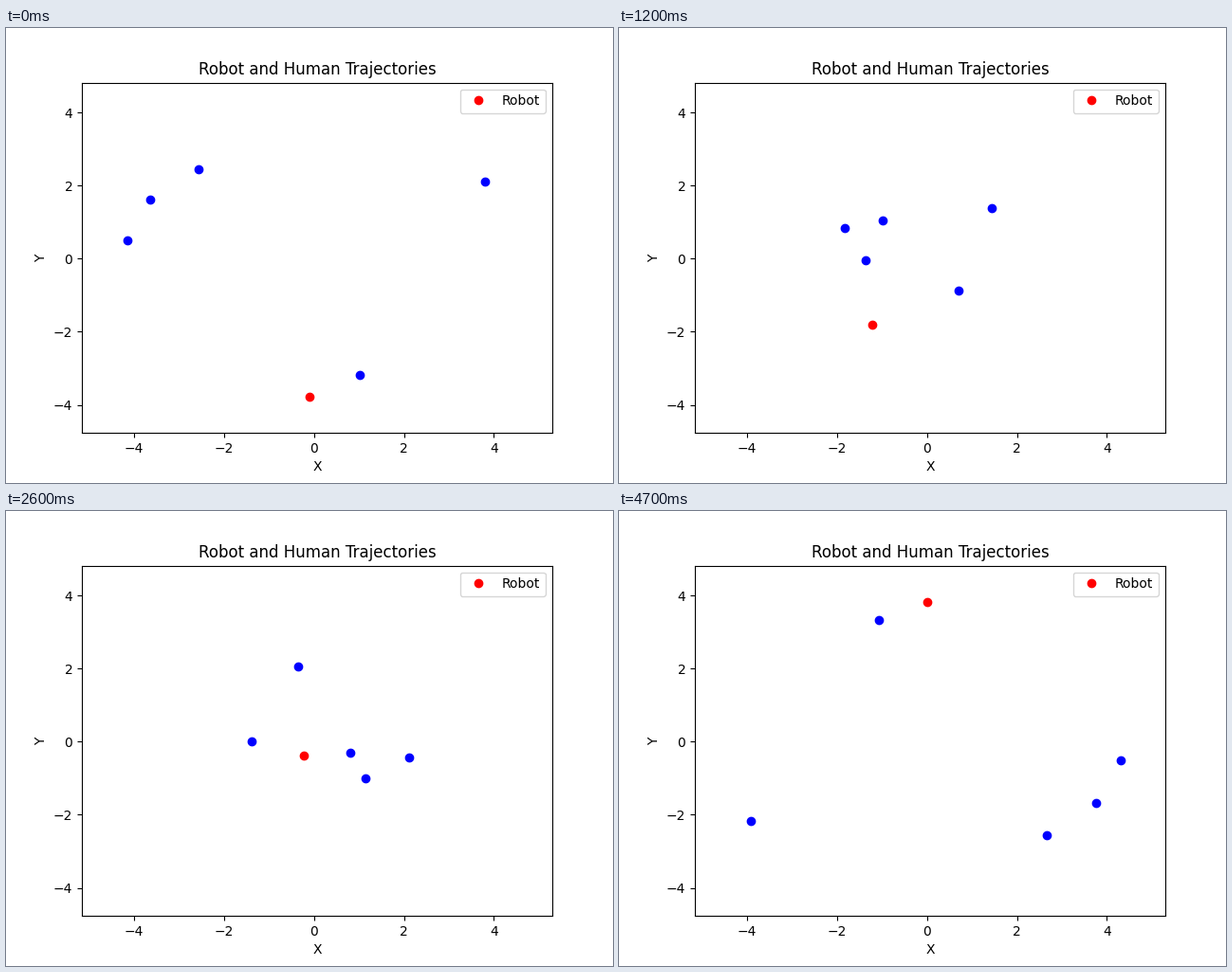
Write a matplotlib script that moves like this. It is 640 by 480 pixels and loops after 4800 ms.

```python
import numpy as np
import matplotlib.pyplot as plt
from matplotlib.animation import FuncAnimation

FRAMES = 48
INTERVAL = 100
STEP = 0.25            # distance walked per frame at full speed
MEET, FREE = 16, 22    # frames when the crowd meets and when it has parted

# Each human: goal, place at MEET, place at FREE
HUMANS = np.array([
    [(4.31, -0.51), (-0.35, -0.22), (1.12, -0.38)],
    [(3.78, -1.69), (-1.16, 0.56), (-0.10, 0.11)],
    [(2.67, -2.56), (-0.42, 0.53), (0.45, -0.30)],
    [(-3.94, -2.19), (0.57, 1.13), (-0.63, 0.66)],
    [(-1.07, 3.33), (0.57, -0.04), (0.15, 1.20)],
])
ROBOT_TIMES = np.array([0, 8, MEET, FREE, 31, 39, 47])
ROBOT = np.array([(-0.10, -3.78), (-0.88, -2.30), (-1.35, -1.39), (-0.86, -0.87),
                  (0.51, 0.40), (0.49, 1.98), (0.0, 3.83)])


def smooth_path(times, points, t):
    """Cubic Hermite curve through points given at uneven times."""
    slopes = np.gradient(points, times, axis=0)
    i = np.clip(np.searchsorted(times, t, side="right") - 1, 0, len(times) - 2)
    h = (times[i + 1] - times[i])[:, None]
    u = (t - times[i])[:, None] / h
    return ((1 + 2 * u) * (1 - u) ** 2 * points[i]
            + u * (1 - u) ** 2 * h * slopes[i]
            + u ** 2 * (3 - 2 * u) * points[i + 1]
            + u ** 2 * (u - 1) * h * slopes[i + 1])


def step_towards(pos, goal, step=STEP):
    """One step at full speed, easing off within one unit of the goal."""
    gap = goal - pos
    return pos + step * gap / max(1.0, np.hypot(*gap))


def human_path(goal, meet, free):
    """Cross the circle from the point opposite the goal."""
    start = step_towards(-goal, goal, 0.15)
    t = np.arange(FREE + 1)
    t = np.where(t < MEET, MEET * (t / MEET) ** 1.08, t)   # slow start
    path = [np.array(p) for p in zip(*(
        np.interp(t, [0, MEET, FREE], axis)
        for axis in np.transpose([start, meet, free])))]
    while len(path) < FRAMES:
        path.append(step_towards(path[-1], goal))
    return path


robot_path = smooth_path(ROBOT_TIMES, ROBOT, np.arange(FRAMES))
human_paths = np.array([human_path(*h) for h in HUMANS])

fig, ax = plt.subplots(figsize=(6.4, 4.8), dpi=100)
ax.set_xlim(-5.165, 5.3)
ax.set_ylim(-4.77, 4.822)
ax.set_xlabel("X")
ax.set_ylabel("Y")
ax.set_title("Robot and Human Trajectories")

robot, = ax.plot([], [], "ro", label="Robot")
humans, = ax.plot([], [], "bo")
ax.legend(loc="upper right")


def update(n):
    robot.set_data(robot_path[n:n + 1].T)
    humans.set_data(human_paths[:, n].T)
    return robot, humans


anim = FuncAnimation(fig, update, frames=FRAMES, interval=INTERVAL,
                     repeat=True, repeat_delay=0)
plt.show()
```
